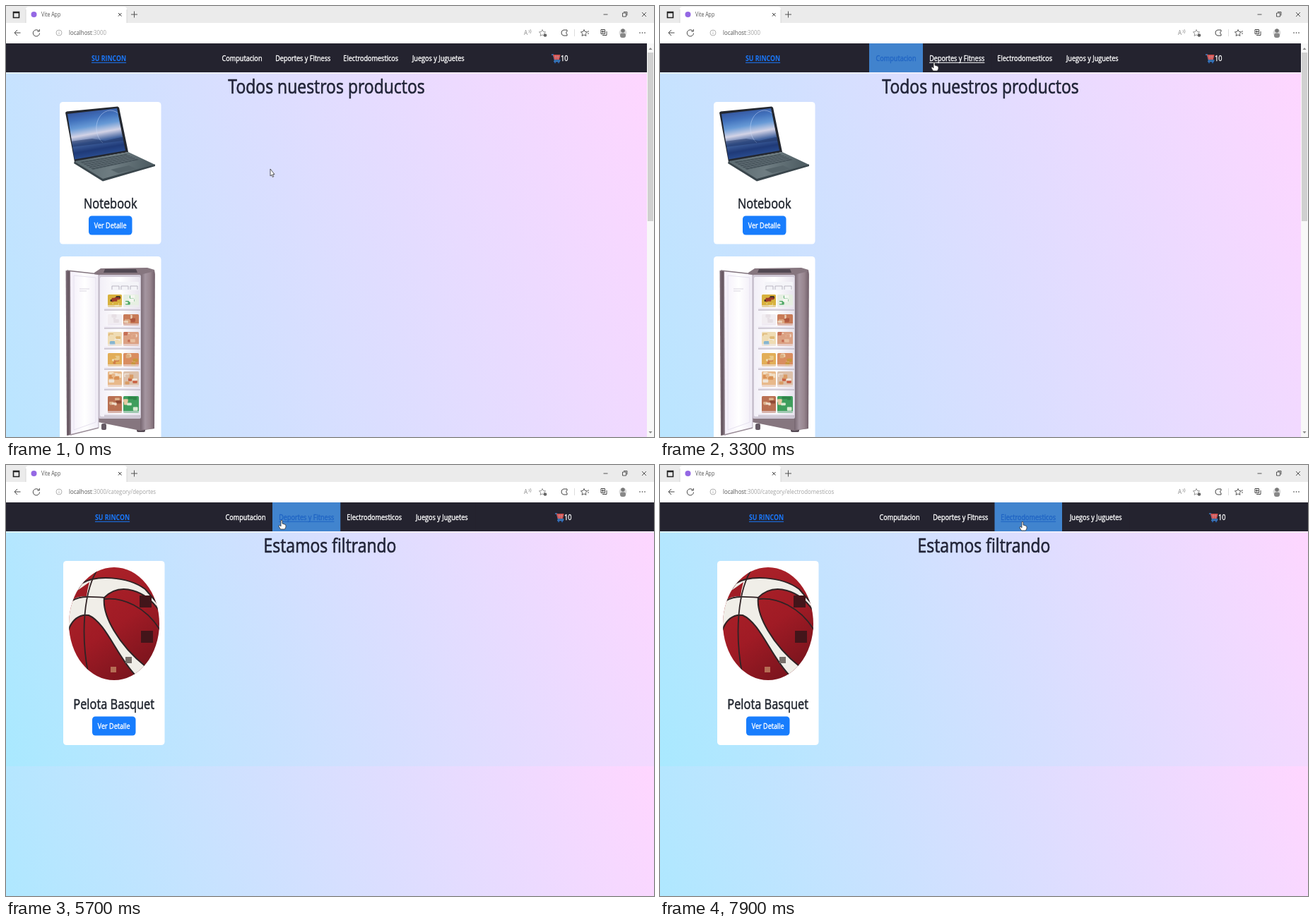
An HTML page with a canvas for the animation above (8000 ms loop, 917x611 px).

```html
<!DOCTYPE html>
<html lang="es">
<head>
<meta charset="utf-8">
<title>Vite App</title>
<style>
  html, body { margin: 0; width: 100%; height: 100%; overflow: hidden; background: #fff; }
  canvas { display: block; width: 917px; height: 611px; }
</style>
</head>
<body>
<canvas id="stage" width="917" height="611"></canvas>
<script>
const ctx = document.getElementById('stage').getContext('2d');
const LOOP = 8000, STEP = 100, FADE = 600;
// The 1536 x 864 desktop is shown on a 917 x 611 stage.
const SX = 917 / 1536, SY = 611 / 864, SQUEEZE = SX / SY;
const FONT = '"Open Sans", "Noto Sans", sans-serif';
const DARK = [36, 35, 47], HOVER = [65, 132, 206], LINK = [31, 100, 196], WHITE = [255, 255, 255];
const LOADED = 5700;

const ITEMS = [
  { label: 'Computacion', x: 296, w: 76, on: 1875, off: 3290 },
  { label: 'Deportes y Fitness', x: 372, w: 96.5, on: 3290, off: 6160 },
  { label: 'Electrodomesticos', x: 468.5, w: 95.5, on: 6380, off: 9000 },
  { label: 'Juegos y Juguetes', x: 564, w: 95.5, on: 9000, off: 9000 }
];

// time, x, y of the pointer tip
const PATH = [
  [0, 374, 231], [100, 374, 231], [500, 376, 222], [700, 376, 222], [1500, 362, 150],
  [1800, 348, 102], [1900, 344, 91], [2100, 342, 85], [2400, 341, 84], [2900, 341, 84],
  [3200, 366, 82], [3300, 388, 79], [3800, 390, 78], [5900, 390, 78], [6100, 405, 88],
  [6200, 432, 98], [6300, 466, 99], [6400, 493, 89], [6700, 513, 80], [8000, 513, 80]
];

const clamp = v => Math.max(0, Math.min(1, v));
const rgb = c => `rgb(${c.map(Math.round).join()})`;
const mix = (a, b, k) => rgb(a.map((v, i) => v + (b[i] - v) * k));

// CSS "ease" timing: cubic-bezier(.25, .1, .25, 1)
function ease(x) {
  let lo = 0, hi = 1, u = 0.5;
  for (let i = 0; i < 20; i++) {
    u = (lo + hi) / 2;
    const bx = 0.75 * u * (1 - u) + u ** 3;
    if (bx < x) lo = u; else hi = u;
  }
  return 0.3 * u * (1 - u) ** 2 + 3 * u * u * (1 - u) + u ** 3;
}
const ramp = (t, start) => ease(clamp((t - start) / FADE));

function rect(x, y, w, h, fill, r = 0) {
  ctx.fillStyle = fill;
  ctx.beginPath();
  ctx.roundRect(x, y, w, h, r);
  ctx.fill();
}

function poly(fill, ...p) {
  ctx.fillStyle = fill;
  ctx.beginPath();
  for (let i = 0; i < p.length; i += 2) ctx.lineTo(p[i], p[i + 1]);
  ctx.closePath();
  ctx.fill();
}

function disc(x, y, r, fill) {
  ctx.fillStyle = fill;
  ctx.beginPath();
  ctx.arc(x, y, r, 0, Math.PI * 2);
  ctx.fill();
}

function line(d, color, width = 1) {
  ctx.strokeStyle = color;
  ctx.lineWidth = width;
  ctx.stroke(new Path2D(d));
}

function shade(x0, y0, x1, y1, ...colors) {
  const g = ctx.createLinearGradient(x0, y0, x1, y1);
  colors.forEach((c, i) => g.addColorStop(i / (colors.length - 1), c));
  return g;
}

// "heavy" outlines the glyphs thinly to match a medium weight.
function text(str, x, y, size, color, { align = 'left', weight = 400, underline = false, heavy = false } = {}) {
  ctx.save();
  ctx.translate(x, y);
  ctx.scale(SQUEEZE, 1);
  ctx.font = `${weight} ${size}px ${FONT}`;
  ctx.textAlign = align;
  ctx.fillStyle = ctx.strokeStyle = color;
  ctx.fillText(str, 0, 0);
  if (heavy) {
    ctx.lineWidth = 0.2 + size * 0.018;
    ctx.lineJoin = 'round';
    ctx.strokeText(str, 0, 0);
  }
  const w = ctx.measureText(str).width;
  if (underline) ctx.fillRect(align === 'center' ? -w / 2 : 0, 1.5, w, 1);
  ctx.restore();
  return w * SQUEEZE;
}

function backdrop(y, width, height) {
  const w = width / SX, h = height / SY, a = 65 * Math.PI / 180;
  const s = Math.sin(a), c = Math.cos(a), half = (w * s + h * c) / 2;
  ctx.save();
  ctx.translate(0, y);
  ctx.scale(SX, SY);
  ctx.fillStyle = shade(w / 2 - s * half, h / 2 + c * half, w / 2 + s * half, h / 2 - c * half, '#a9e9ff', '#ffd6ff');
  ctx.fillRect(0, 0, w, h);
  ctx.restore();
}

function browser(path) {
  const ink = '#444', pale = '#8a8a8a';
  rect(0, 0, 917, 53, '#fff');
  rect(0, 0, 917, 24, '#ebebeb');
  rect(28, 1, 143, 30, '#fff', 4);
  line('M28 5V24M171 5V24', '#d6d6d6');
  line('M10.5 8.5h8v8h-8zM10.5 9.5h8', '#222', 1.6);
  disc(39.5, 12, 4, '#9468e4');
  text('Vite App', 50, 15, 8.3, '#555');
  line('M159 10l4.5 4.5m0-4.5l-4.5 4.5', '#333');
  line('M177 12h9M181.5 7.5v9', '#555');
  line('M845.5 12h6M872.5 10h5v5h-5zM874 8.5h5v5M900 9l6 6m0-6l-6 6', '#444', 0.9);

  line('M20.5 38H12m4-4l-4 4l4 4', ink);
  line('M46.5 35.5a4.6 4.6 0 1 0 1 3M47.3 33v3h-3', ink);
  line('M79 38a4 4 0 1 0-8 0a4 4 0 1 0 8 0M75 37.5v2.5M75 35.5v1', '#aaa', 0.9);
  const w = text('localhost', 89, 41.3, 9.3, '#555');
  text(':3000' + path, 89 + w, 41.3, 9.3, '#a2a2a2');

  text('A', 733, 41, 9.5, pale);
  line('M740 34q1.5 2 0 4m2-5q2 3 0 6', pale, 0.7);
  const star = (x, c) => line(`M${x} 33.5l1.4 3l3.2.4l-2.3 2.2l.6 3.3l-2.9-1.6l-2.9 1.6l.6-3.3l-2.3-2.2l3.2-.4z`, c, 0.9);
  star(759, pale);
  disc(763, 41.5, 2.3, '#666');
  line('M794 36v-2h-5a4 4 0 0 0-3 4a4 4 0 0 0 3 4h5v-2q-3-2 0-4', ink);
  line('M804.5 33v10', '#ddd');
  star(818, ink);
  line('M823 36h2M823 39h2', ink, 0.9);
  line('M842 33.5h5.5v6H842zM844 41.5h6V36M844.7 34.5v4m-2-2h4', ink);
  disc(873, 38, 5.5, '#ddd');
  disc(873, 35, 2.8, '#777');
  rect(869, 38.5, 8, 6.5, '#888', 3);
  for (let i = 0; i < 3; i++) disc(897 + i * 3.5, 38, 0.8, '#333');
}

function cart(x) {
  line(`M${x} 69h2.5l2 8h8`, '#3d7fc4', 1.4);
  poly('#d5504c', x + 2, 69, x + 12.5, 69, x + 11, 76, x + 4, 76);
  line(`M${x + 4} 72h7.5M${x + 6} 70v6M${x + 9} 70v6`, '#c9a0b0', 0.6);
  line(`M${x + 3} 78.5h9`, '#3d7fc4', 1.5);
  disc(x + 5, 80, 1.2, '#2b5fa8');
  disc(x + 10, 80, 1.2, '#2b5fa8');
  text('10', x + 13, 78.3, 10.8, '#fff', { heavy: true });
}

const overItem = (it, [x, y], dx) => y < 94 && x >= it.x + dx && x < it.x + dx + it.w;

function navbar(t, dx, width, pointer) {
  rect(0, 53, width, 41, rgb(DARK));
  rect(0, 94, width, 2, 'rgba(255,255,255,.5)');
  text('SU RINCON', 121 + dx, 78.3, 10.4, '#1a78fb', { weight: 700, underline: true });
  for (const it of ITEMS) {
    const k = ramp(t, it.on) * (1 - ramp(t, it.off));
    const x = it.x + dx;
    if (k > 0) rect(x, 53, it.w, 41, mix(DARK, HOVER, k));
    text(it.label, x + it.w / 2, 78.3, 10.8, mix(WHITE, LINK, k), {
      align: 'center', heavy: true, underline: overItem(it, pointer, dx)
    });
  }
  cart(772 + dx);
}

function laptop() {
  const screen = [87, 153, 157, 145, 169, 205, 97, 217.5];
  poly('#23272f', 84, 151, 86, 149.5, 158, 142.5, 160, 144, 173, 207, 97, 221);
  poly(shade(120, 147, 132, 214, '#35569f', '#4272bd', '#679ad6', '#d3d3e6', '#42639f', '#1f3a78', '#2b4f94'), ...screen);
  ctx.save();
  ctx.beginPath();
  for (let i = 0; i < 8; i += 2) ctx.lineTo(screen[i], screen[i + 1]);
  ctx.clip();
  line('M137 194a20 25 0 1 1 28-8', 'rgba(205,222,250,.6)', 0.8);
  poly('rgba(24,42,92,.45)', 91, 192, 122, 188, 140, 191, 172, 184, 172, 190, 93, 200);
  ctx.restore();
  poly(shade(100, 220, 200, 235, '#5b6a70', '#6f7d82', '#4f5e64'), 97, 220, 173, 207, 211, 225, 137, 246);
  poly('#3a464c', 97, 220, 137, 245, 211, 224.5, 211, 227, 137, 248.5, 96, 223);
  poly('#46535a', 105, 221, 170, 210, 188, 218, 123, 232);
  for (let i = 1; i < 5; i++) line(`M${105 + i * 3.6} ${221 + i * 2.2}L${170 + i * 3.6} ${210 + i * 1.6}`, '#77848a', 0.6);
  for (let i = 1; i < 12; i++) line(`M${105 + i * 5.4} ${221 - i * 0.92}l18 11`, '#65727a', 0.5);
  poly('#56646a', 148, 232, 174, 226, 185, 231, 159, 237);
}

function noise(seed) {
  return () => (seed = seed * 16807 % 2147483647) / 2147483647;
}

// One clear bin filled with small packages in the given tones.
function bin(x, y, w, h, tones, rand) {
  rect(x, y, w, h, tones[0], 1.5);
  for (let i = 0; i < 9; i++) {
    const px = x + rand() * (w - 8), py = y + rand() * (h - 6);
    rect(px, py, 5 + rand() * 3, 3 + rand() * 3, tones[i % tones.length], 1);
  }
  rect(x, y + h - 3, w, 3, 'rgba(240,236,246,.55)');
}

function shelf(y, h, left, right) {
  const rand = noise(y * 31);
  bin(144, y, 20, h - 4, left, rand);
  bin(166, y, 22, h - 4, right, rand);
  line(`M139 ${y + h - 1.5}H190`, '#e9e4f0', 2);
  line(`M139 ${y + h}H190`, '#a59dac', 0.9);
}

function fridge() {
  rect(135, 592, 7, 9, '#655a64', 2);
  rect(185, 596, 12, 8, '#554a54', 2);
  poly('#86767f', 125, 378, 134, 372, 200, 371, 210, 374, 211, 380, 210, 599, 190, 602, 131, 590);
  poly(shade(190, 0, 211, 0, '#75656f', '#a596a1', '#98868f', '#6f5e68'), 190, 381, 210, 376, 210, 599, 190, 601);
  poly('#514852', 140, 373, 184, 373, 186, 378, 138, 378);
  rect(131, 381, 60, 204, '#cfc8d5', 2);
  rect(133, 384, 57, 198, shade(133, 0, 190, 0, '#f2eff7', '#fff', '#e8e4ee'), 2);
  rect(148, 391, 40, 12, '#f4f4f8', 1);
  for (let i = 0; i < 3; i++) line(`M${150 + i * 13} 402v-5h10v5`, '#aaa6b4', 0.8);
  shelf(409, 22, ['#d8b23e', '#2e2522', '#e9d789', '#9d3c2a'], ['#e6efe2', '#4fa866', '#f4f6f0']);
  shelf(437, 20, ['#f1edf1', '#f6f4f6', '#e6dfe4'], ['#c87b58', '#b0583f', '#dba37c', '#ead0b8']);
  shelf(462, 24, ['#efdcb4', '#86b6cf', '#f2ece0', '#dfb877'], ['#dba183', '#f0d5c2', '#c66f55', '#e8bfa0']);
  shelf(492, 23, ['#e2ae58', '#f0dcb0', '#cf7d4b', '#e9c98c'], ['#d98d60', '#efd9b8', '#c9973f', '#dcae80']);
  shelf(518, 26, ['#e8b98a', '#f1dfc5', '#d99256', '#efe6da'], ['#dcc0aa', '#c95f42', '#f0e4d8', '#d99c66']);
  shelf(553, 28, ['#b97052', '#8f4a35', '#dcb28c', '#efdcc8'], ['#3f9e5d', '#d8ead2', '#2f8448', '#e6c9a0']);
  poly(shade(92, 0, 131, 0, '#f4effa', '#fff', '#f1edf7'), 91, 376, 131, 381, 131, 598, 91, 609);
  line('M96 382L127 385V590L96 601Z', '#e4dfec', 0.9);
  line('M104 401h14m-14 3h10', '#d1ccd9', 0.8);
  line('M131 381V598', '#b9afbf', 1);
  poly(shade(84, 0, 93, 0, '#837480', '#65555f', '#a69aa4'), 84.5, 375, 91, 376, 92, 608, 86, 609);
  line('M86 375L131 380', '#83757f', 1.6);
  line('M91 608L131 598', '#9b8e98', 1.5);
}

function ball() {
  const seam = '#302325';
  ctx.save();
  ctx.beginPath();
  ctx.ellipse(153, 225, 64, 80, 0, 0, Math.PI * 2);
  ctx.clip();
  rect(88, 144, 130, 162, shade(105, 160, 200, 300, '#ac2229', '#a01b25', '#75131c'));
  const white = new Path2D('M107 168C126 156 171 157 197 176L216 198L217 207C198 178 162 165 139 188' +
    'C136 213 159 255 198 286L184 299C157 272 142 224 117 213C103 211 93 220 88 235V202C92 190 99 179 107 168Z');
  ctx.fillStyle = '#f0eee8';
  ctx.fill(white);
  ctx.strokeStyle = seam;
  ctx.lineWidth = 2;
  ctx.stroke(white);
  ctx.fillStyle = '#a01c25';
  ctx.fill(new Path2D('M101 178L118 166Q115 177 114 186Q102 185 93 192Z'));
  line('M87 197C103 183 122 187 139 188M132 144C109 177 106 240 116 294M139 190C165 187 198 201 218 234', seam, 1.8);
  rect(189, 185, 17, 17, '#43151a');
  rect(191, 235, 17, 17, '#43151a');
  rect(169, 272, 9, 9, '#77706b');
  rect(148, 286, 8, 8, '#b66d55');
  ctx.restore();
}

function card(x, y, h, title, base) {
  rect(x, y, 143.5, h, '#fff', 4.5);
  if (!title) return;
  const center = { align: 'center', heavy: true };
  text(title, x + 71.7, base, 19.4, '#222730', center);
  rect(x + 41, base + 10.5, 61.5, 27, '#187dfd', 4.5);
  text('Ver Detalle', x + 71.7, base + 28, 10.7, '#fff', center);
}

function scrollbar() {
  rect(907, 53, 10, 558, '#f8f8f8');
  rect(908, 66, 8, 239, '#d0d0d0');
  poly('#8a8a8a', 909.5, 62, 912, 59, 914.5, 62);
  poly('#8a8a8a', 909.5, 603, 912, 606, 914.5, 603);
}

function pointerAt(t) {
  const i = Math.max(1, PATH.findIndex(p => p[0] >= t));
  const [t0, x0, y0] = PATH[i - 1], [t1, x1, y1] = PATH[i];
  const k = clamp((t - t0) / (t1 - t0));
  return [x0 + (x1 - x0) * k, y0 + (y1 - y0) * k];
}

function drawPointer([x, y], hand) {
  const shape = new Path2D(hand
    ? 'M-1 1Q0-1 1 1V5L4 6Q6 6 6 8V10L4.5 13H-1.5L-4 9Q-4 7-2.5 7.5L-1 9Z'
    : 'M0 0V10L2 8.2L3.3 11.5L4.8 10.8L3.5 7.6H6Z');
  ctx.save();
  ctx.translate(x, y);
  ctx.fillStyle = '#fff';
  ctx.fill(shape);
  ctx.strokeStyle = '#333';
  ctx.lineWidth = 0.8;
  ctx.stroke(shape);
  ctx.restore();
}

function draw(t) {
  const loaded = t >= LOADED, filtering = t >= 3800;
  const dx = loaded ? 5 : 0, width = loaded ? 917 : 907;
  const pointer = pointerAt(t);
  const path = t >= 6700 ? '/category/electrodomesticos' : filtering ? '/category/deportes' : '';

  ctx.clearRect(0, 0, 917, 611);
  if (loaded) {
    backdrop(53, 917, 374);
    backdrop(427, 917, 374);
    card(81, 136, 261, 'Pelota Basquet', 346);
    ball();
  } else {
    backdrop(53, 907, 1255);
    card(76, 136, 201.5, 'Notebook', 287);
    laptop();
    card(76, 355, 300);
    fridge();
    scrollbar();
  }
  const title = filtering ? 'Estamos filtrando' : 'Todos nuestros productos';
  text(title, 453.5 + dx, 124, 27.2, '#222538', { align: 'center', heavy: true });
  navbar(t, dx, width, pointer);
  browser(path);
  drawPointer(pointer, ITEMS.some(it => overItem(it, pointer, dx)));
}

function tick() {
  const t = performance.now() % LOOP;
  draw(Math.floor(t / STEP) * STEP);
  requestAnimationFrame(tick);
}
tick();
</script>
</body>
</html>
```
